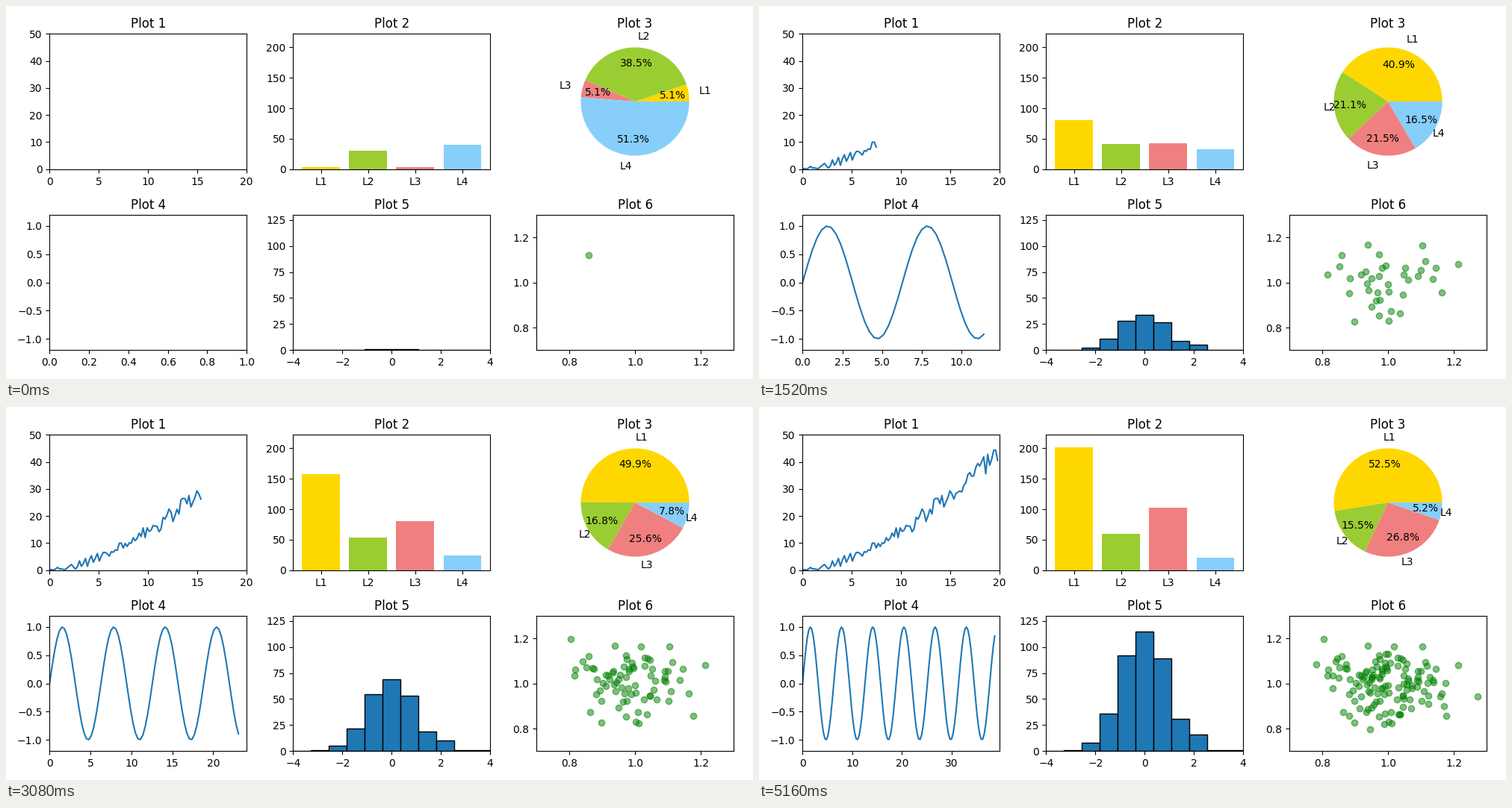
Recreate the animation shown at these times as a matplotlib script. Size 1000 by 500 pixels, loop 5.2 s.

```python
import numpy as np
import matplotlib.pyplot as plt
from matplotlib.animation import FuncAnimation

FRAMES, STEP = 130, 40
LAST = 99  # growth of the first three plots ends here
LABELS = ["L1", "L2", "L3", "L4"]
COLORS = ["gold", "yellowgreen", "lightcoral", "lightskyblue"]
ALIGN = ["left", "left", "right", "right"]

rng = np.random.RandomState(7)

# Plot 1: power curve with noise that widens along x
grow_x = np.linspace(0, 20, 100)
noise = rng.uniform(-1, 1, grow_x.size) * np.sqrt(grow_x)
grow_y = np.abs(0.365 * grow_x ** 1.6 + 0.9 * noise)

# Plot 5: bin heights at the end of the loop
edges = np.linspace(-4, 4, 12)
full = np.array([0, 1, 8, 36, 92, 115, 89, 31, 16, 1, 1])

# Plot 6: normal cloud, one dot more per frame
dots = rng.normal(1, 0.095, (FRAMES, 2))
dots[0] = 0.858, 1.12


def shares(i):
    return [4 + 2 * i, 30 + 0.3 * i, 4 + i, 40 - 0.2 * i]


fig, axes = plt.subplots(2, 3, figsize=(10, 5), dpi=100)
ax1, ax2, ax3, ax4, ax5, ax6 = axes.flat
for n, ax in enumerate(axes.flat, 1):
    ax.set_title(f"Plot {n}")

ax1.set(xlim=(0, 20), ylim=(0, 50))
grow, = ax1.plot([], [])

bars = ax2.bar(LABELS, shares(0), color=COLORS)
ax2.set_ylim(0, shares(LAST)[0] * 1.1)

ax4.set(xlim=(0, 1), ylim=(-1.2, 1.2))
wave, = ax4.plot([], [])

hist = ax5.bar(edges[:-1], 0 * full, width=8 / 11, align="edge",
               edgecolor="black", linewidth=1)
ax5.set(xlim=(-4, 4), ylim=(0, 130), yticks=range(0, 126, 25))

scatter = ax6.scatter([], [], color="green", alpha=0.5)
ax6.set(xlim=(0.7, 1.3), ylim=(0.7, 1.3),
        xticks=[0.8, 1.0, 1.2], yticks=[0.8, 1.0, 1.2])

# Lay out while the pie's axes still carry their plain ticks
fig.tight_layout()


def set_heights(rects, values):
    for rect, value in zip(rects, values):
        rect.set_height(value)


def draw_pie(values):
    ax3.clear()
    ax3.set_title("Plot 3")
    _, names, _ = ax3.pie(values, labels=LABELS, colors=COLORS,
                          autopct="%1.1f%%", labeldistance=1.2,
                          pctdistance=0.7, textprops={"fontsize": 10})
    for name, side in zip(names, ALIGN):
        name.set_ha(side)


def update(i):
    k = min(i, LAST)
    grow.set_data(grow_x[:k], grow_y[:k])
    set_heights(bars, shares(k))
    draw_pie(shares(k))

    x = 0.3 * np.arange(i + 1)
    wave.set_data(x, np.sin(x))
    ax4.set_xlim(0, x[-1] + 1)

    set_heights(hist, np.round(full * (i + 1) / FRAMES))
    scatter.set_offsets(dots[:max(1, i)])


anim = FuncAnimation(fig, update, frames=FRAMES, init_func=lambda: update(0),
                     interval=STEP, repeat=True, repeat_delay=0)
plt.show()
```
